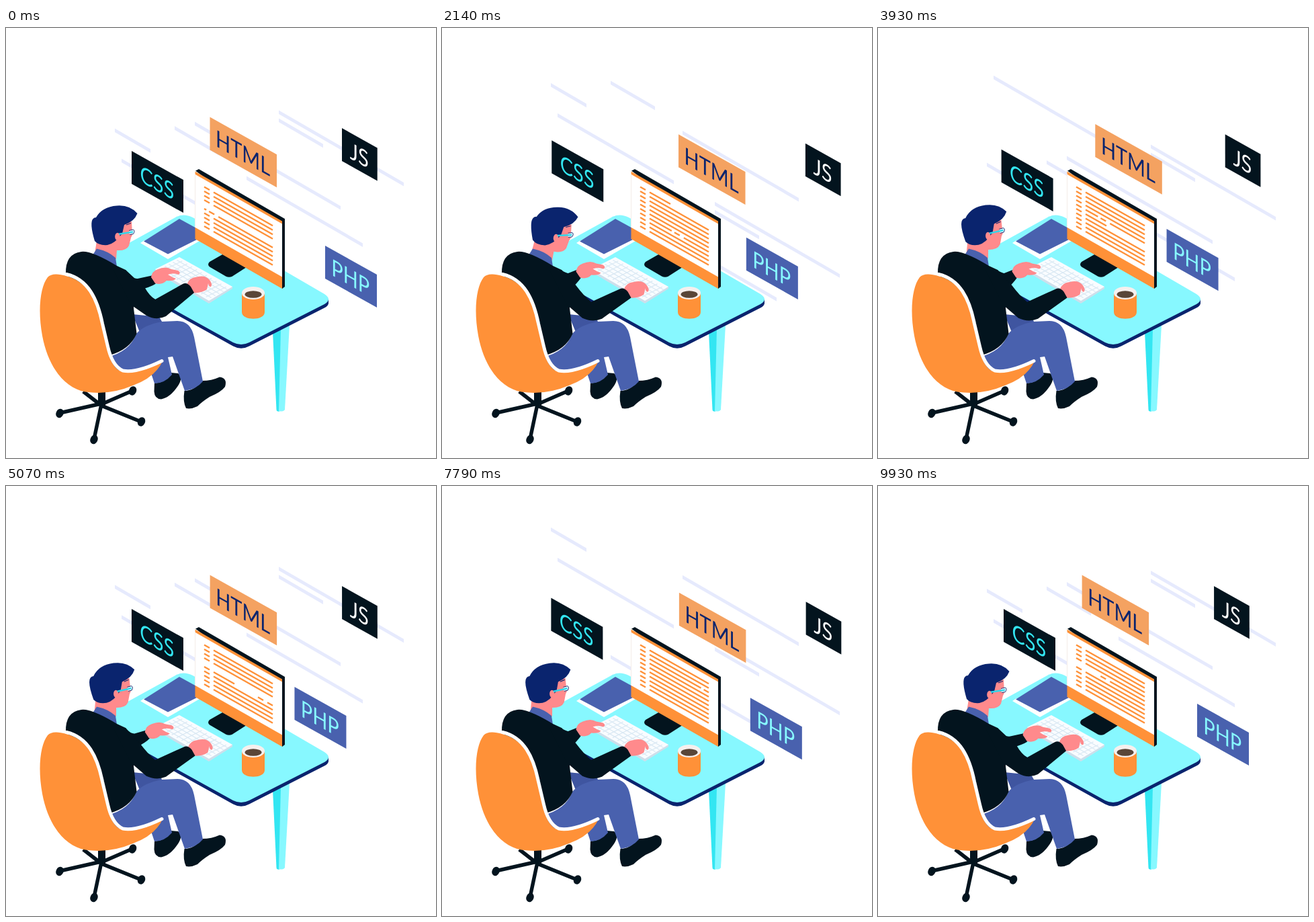
These frames come from a looping animation (640x640 px, 10000 ms). An HTML page:

```html
<!DOCTYPE html>
<html lang="en">
<head>
<meta charset="utf-8">
<title>Coder at desk</title>
<style>
html, body { margin: 0; width: 100%; height: 100%; overflow: hidden; background: #fff; }
svg { display: block; width: 100%; height: 100%; }
text { font: 34.5px Lato, "Open Sans", sans-serif; text-anchor: middle; }
.dark { fill: #03141e; }
.navy { fill: #0a246e; }
.blue { fill: #4961ae; }
.orange { fill: #ff9138; }
.skin { fill: #ff8a8c; }
.cyan { fill: #87f8ff; }
.white { fill: #fff; }
</style>
</head>
<body>
<svg viewBox="0 0 640 640" xmlns="http://www.w3.org/2000/svg">
  <g id="streaks" fill="#e6eafd"></g>
  <g id="tags"></g>

  <!-- desk -->
  <path fill="#33e6f2" d="M397 452L410 446L407 570.5Q403 571.5 402.5 568Z"/>
  <path class="cyan" d="M409 448L422 442L415 568Q414 571 406 570.5Z"/>
  <path class="navy" d="M165 335L258 286L472 400L480 404V410Q479 414 474 416.500L362 473.500Q350 480 338 473.500L165 377Z"/>
  <path class="cyan" d="M163 331L252 282Q264 275 278 282L474 396Q486 404 474 411L362 468Q350 474 338 468L163 371Z"/>
  <path class="white" d="M200 320L206 316L241 335L283 310L288 317L241 344Z"/>
  <path class="blue" d="M205 317.500L258 284L300 307L241 336.500Z"/>
  <path class="dark" d="M303 348L324 336L358 356L337 369.500Q332 372 327 369.500L303 355.500Q299 352 303 348Z"/>

  <!-- monitor -->
  <path class="dark" d="M282 212.500L287 210L415 284V385L411 388L400 300Z"/>
  <path class="orange" d="M281.500 213.500L411 287.500V388L281.500 314Z"/>
  <path class="white" d="M281 217.500L411 291.500V370.500L281 296.500Z"/>
  <path d="M281.500 217V297" stroke="#f1e7e2" stroke-width=".8"/>
  <path id="code" fill="none" stroke="#ff9138" stroke-width="2.3"/>

  <!-- mug -->
  <path class="orange" d="M351 395V423C351 436 385 436 385 423V395Z"/>
  <ellipse cx="368" cy="394.500" rx="17" ry="9.500" fill="#f6f0ee"/>
  <ellipse cx="368" cy="396.500" rx="12.500" ry="5.200" fill="#5a4638"/>

  <!-- keyboard -->
  <path fill="#cddfeb" d="M222 359L337 385V388L302 410L222 363Z"/>
  <path fill="#f9fcff" d="M222 359L258 341L337 385L302 406Z"/>
  <path id="keys" stroke="#d9e8f3" stroke-width="1.200" fill="none"/>

  <g id="head">
    <path class="skin" d="M135 317L132 336L164 344L165 331Q179 332 183 324L186 312L188 308L187 288L160 292Z"/>
    <path class="navy" d="M134 282Q143 266 165 264.500Q184 263 195.500 276Q191 288 176 293L173 306Q162 321 151 323Q138 324 132 317Q124 290 129.500 284Q131 282 134 282Z"/>
    <ellipse class="skin" cx="166" cy="310.500" rx="3.800" ry="5.800"/>
    <path d="M179 293L186 290.500" stroke="#0a246e" stroke-width="1.200"/>
    <path d="M183 301.500L189.500 300Q192.500 302 189.500 306.500L184 307.500" fill="#e9faff" stroke="#0a246e" stroke-width=".9"/>
    <path d="M168 306.800L189 303.500" stroke="#33d6ea" stroke-width="2.500"/>
  </g>
  <path class="blue" d="M127 341L135 328.500Q152 332 163 342L165 355Z"/>

  <!-- chair base -->
  <path class="dark" d="M137 540H148V562H137Z"/>
  <path d="M115 541L142 562L201 586M142 560L188 540M142 559L80 573M142 560L131 612" stroke="#03141e" stroke-width="5.500" fill="none"/>
  <g id="casters" class="dark"></g>

  <!-- legs -->
  <path class="dark" d="M221 528Q235 530 245 513L256 514Q264 519 257 531Q245 550 231 552.500Q221 552 220.500 541Z"/>
  <path class="dark" d="M265.500 540Q280 540 292 525Q306 525 318 519.500Q330 521 326 534Q320 542 303 549Q292 556 285 563Q276 567.500 268 566Q263 556 265.500 540Z"/>
  <path fill="#3f55a0" d="M188 426L228 430L235 442L200 455Z"/>
  <path class="blue" d="M150 490Q184 482 194 455Q205 442 232 437L255 436Q275 436 280 460L293 526Q283 538 266 540L248 489L241 490L247 516Q236 529 221 529L214 508Q190 516 160 508Z"/>

  <!-- upper body -->
  <path id="backArm" class="dark"/>
  <path id="backHand" class="skin" d="M216 371Q217 362 226 359Q238 354 246 359L256 361Q261 364 257 367Q248 364 241 367Q247 371 253 373Q249 377 239 376Q232 383 222 380Z"/>
  <path class="dark" d="M89 366Q88 336 112 333Q127 331 165 354L178 360L192 382L190 417L194.500 455Q184 479 154 487L130 410Z"/>
  <path id="frontHand" class="skin" d="M269 382Q273 371 284 370.500Q297 367 303 375Q308 382 305 385Q302 386 301 380L299 389Q291 395 279 394Z"/>
  <path id="frontArm" class="dark"/>

  <!-- seat -->
  <path class="orange" d="M62 371Q69 363 90 369C122 379 133 400 142 440L150 474Q156 506 173 512Q200 513 233 496Q222 520 189 532Q154 547 118 541.500C88 536 63 506 54 458C47 420 51 385 62 371Z"/>
  <path d="M90 366.500C122 374 136 403 143.500 440L151.500 474Q158 503 174 510Q194 514 232 495.500" fill="none" stroke="#fff" stroke-width="5" stroke-linecap="round"/>
</svg>
<script>
const LOOP = 10000, HALF = LOOP / 2, STEP = LOOP / 140;
const SLOPE = 0.567;
const NS = "http://www.w3.org/2000/svg";
const $ = id => document.getElementById(id);
const add = (parent, name, attrs) => {
  const el = document.createElementNS(NS, name);
  for (const k in attrs) el.setAttribute(k, attrs[k]);
  return parent.appendChild(el);
};
const move = (el, x, y) => el.setAttribute("transform", `translate(${x} ${y})`);
const mod = (n, m) => ((n % m) + m) % m;
const ease = p => (1 - Math.cos(Math.PI * Math.min(1, Math.max(0, p)))) / 2;

// Out to 1 at peak, back to 0 at end
const swing = (t, peak, end) => t < peak ? ease(t / peak) : ease((end - t) / (end - peak));

// Soft pulse around a moment of the loop
function pulse(t, mid, reach, fade = reach) {
  const d = Math.abs(mod(t - mid + HALF, LOOP) - HALF);
  return ease((reach - d) / fade);
}

// Streaks climb to a slanted ceiling, then return from below
const UP = 0.0315, BACK = 0.0477;
const streaks = [
  [162, 149.5, 53], [172, 194.5, 173], [251, 146, 66], [281, 139.5, 217],
  [406, 122.5, 186], [406, 134.5, 66], [358, 220.5, 173]
].map(([x, y, w]) => {
  const d = w * 0.578, ceiling = 51 + 0.28 * (x - 162);
  const el = add($("streaks"), "path", { d: `M${x} ${y}l${w} ${d}v5.5l${-w} ${-d}z` });
  return { el, turn: (y - ceiling) / UP };
});

const tags = [
  { word: "CSS", fill: "#03141e", ink: "#33e6f2", x: 187, y: 183, w: 77, dx: -25.5, dy: -17, peak: 2580, end: 4345, loop: HALF },
  { word: "HTML", fill: "#f4a261", ink: "#0a246e", x: 303.5, y: 132.5, w: 99.5, dx: 51, dy: 27, peak: 2500, end: HALF, loop: HALF },
  { word: "JS", fill: "#03141e", ink: "#fff", x: 500, y: 149, w: 52.7, dx: 43, dy: 24, peak: 2500, end: HALF, loop: HALF },
  { word: "PHP", fill: "#4961ae", ink: "#87f8ff", x: 475, y: 324, w: 77, dx: -47, dy: -25.8, peak: 4450, end: LOOP, loop: LOOP }
];
for (const g of tags) {
  const h = g.w * 0.56;
  g.el = add($("tags"), "g", {});
  add(g.el, "path", { d: `M0 0l${g.w} ${h}v49l${-g.w} ${-h}z`, fill: g.fill });
  add(g.el, "text", { transform: `matrix(.84 .472 0 1 ${g.w / 2 - 0.7} ${h / 2 + 38})`, fill: g.ink }).textContent = g.word;
}

for (const [x, y] of [[188.5, 540], [80, 573.5], [201.5, 586], [131, 612.5]])
  add($("casters"), "ellipse", { cx: x, cy: y, rx: 5.5, ry: 7, transform: `rotate(25 ${x} ${y})` });

// Keyboard grid: a along the rows, b across them
const key = (a, b) => `${222 + 80 * a + 36 * b} ${359 + 47 * a - 18 * b}`;
let grid = "";
for (let i = 1; i < 6; i++) grid += `M${key(0.03, i / 6)}L${key(0.97, i / 6)}`;
for (let i = 1; i < 11; i++) grid += `M${key(i / 11, 0.08)}L${key(i / 11, 0.92)}`;
$("keys").setAttribute("d", grid);

// A cursor sweeps the code row by row: new text behind it, old text ahead
const ROWS = 10, LEFT = 295, INDENT = 309, RIGHT = 397;

function rowEnd(n) {
  n = mod(n, 50);
  if (n === 4) return 0;
  return n % 15 === 5 ? 340 : RIGHT;
}
function dash(row, a, b) {
  if (b - a < 1) return "";
  const y = x => 236.5 + row * 6.5 + (x - LEFT) * SLOPE;
  return `M${a} ${y(a)}L${b} ${y(b)}`;
}
function line(row, end, from, to) {
  if (!end) return "";
  return dash(row, Math.max(LEFT, from), Math.min(LEFT + 8, to)) +
    dash(row, Math.max(INDENT, from), Math.min(end, to));
}
function codePath(t) {
  const u = 5.07 + t / 100, current = Math.floor(u);
  const x = LEFT + (u - current) * (RIGHT - LEFT);
  let d = "";
  for (let n = current; n > current - ROWS; n--) {
    const row = mod(n, ROWS);
    if (n < current) d += line(row, rowEnd(n), LEFT, RIGHT);
    else d += line(row, rowEnd(n), LEFT, x - 4) + dash(row, x, Math.min(RIGHT, x + 8)) +
      line(row, rowEnd(n - ROWS), x + 14, RIGHT);
  }
  return d;
}

function pose(t) {
  const right = pulse(t, 1750, 1400, 700) + pulse(t, 6450, 1400, 700);
  const left = pulse(t, 4400, 1400, 700) + pulse(t, 8350, 1400, 700);
  $("head").setAttribute("transform", `rotate(${6 * right - 3.5 * left} 148 345)`);

  // Both hands rest at the loop ends; the back one also strays mid-loop
  const away = 1 - pulse(t, 0, 700);
  const r = away - 0.9 * pulse(t, 5350, 550), bx = -16.5 * r, by = -8.5 * r;
  move($("backHand"), bx, by);
  $("backArm").setAttribute("d",
    `M160 352L178 361Q186 ${374 - 9 * r} ${196 + bx / 2} ${373 - 8 * r}L${217 + bx} ${368.5 + by}` +
    `Q${223 + bx} ${371 + by} ${224 + bx} ${379 + by}Q${222 + bx} ${383 + by} ${205 + bx / 2} ${388 + by / 2}L175 400Z`);

  const fx = 1.5 * away, fy = 7.5 * away;
  move($("frontHand"), fx, fy);
  $("frontArm").setAttribute("d",
    `M160 360L178 360L${207 - fy} ${387 - fy / 2}Q${213 - fy / 3} 398 222 ${404 + fy / 2}L${263 + fx} ${381 + fy}` +
    `Q${269 + fx} ${378 + fy} ${275 + fx} ${385 + fy}L${280 + fx} ${394 + fy}L238 ${429 + fy / 2}` +
    `Q224 ${436 + fy / 3} 209 ${428 + fy / 2}L186 412Z`);
}

function draw(time) {
  const t = Math.floor((time % LOOP + 4) / STEP) * STEP % LOOP;
  const h = t % HALF;
  for (const s of streaks) move(s.el, 0, h < s.turn ? -UP * h : BACK * (HALF - h));
  for (const g of tags) {
    const k = swing(t % g.loop, g.peak, g.end);
    move(g.el, g.x + g.dx * k, g.y + g.dy * k);
  }
  $("code").setAttribute("d", codePath(h));
  pose(t);
}

let start;
function tick(now) {
  if (start === undefined) start = now;
  draw(now - start);
  requestAnimationFrame(tick);
}
draw(0);
requestAnimationFrame(tick);
</script>
</body>
</html>
```
